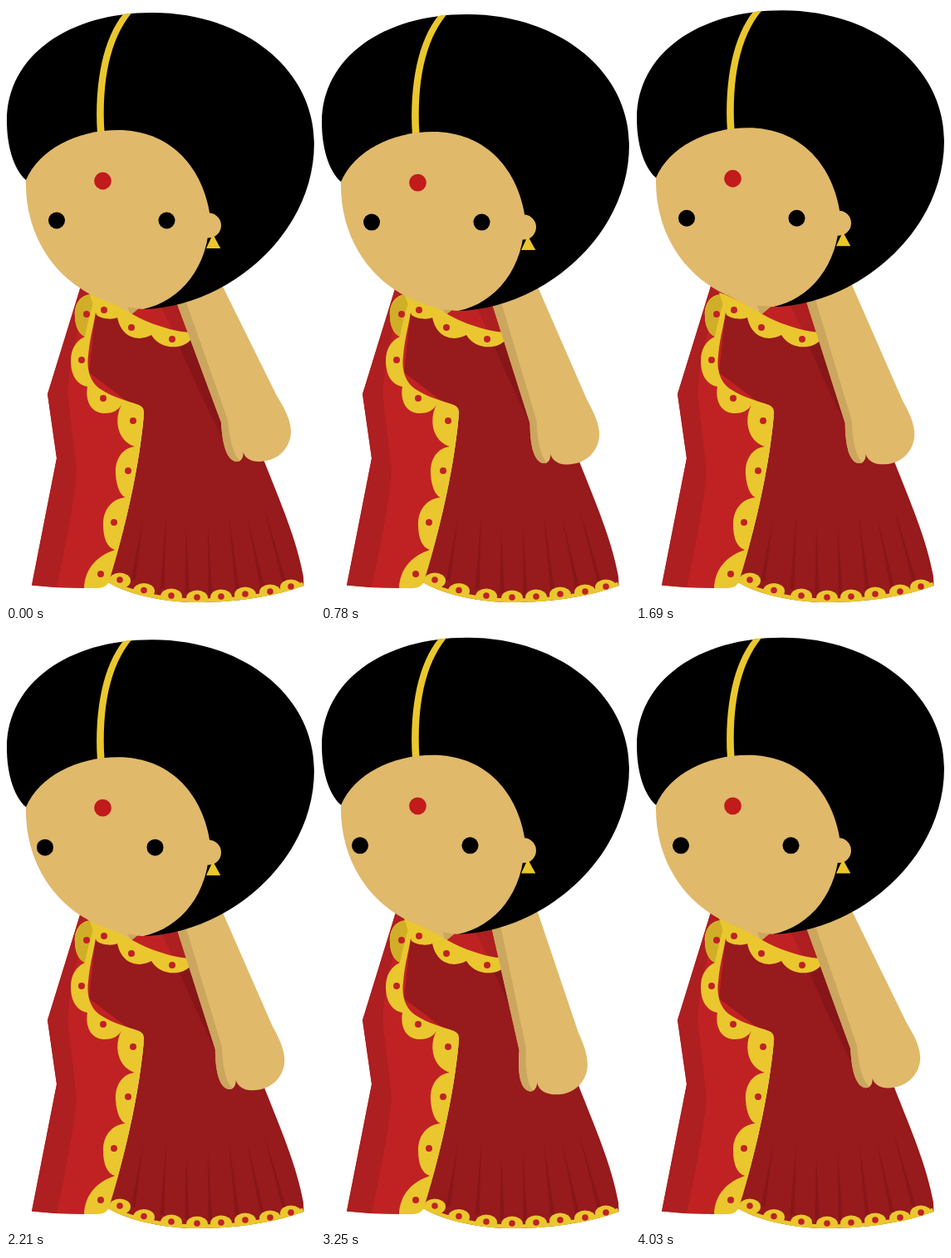
An HTML page for the animation above (4160 ms loop, 372 by 718 pixels).

```html
<!DOCTYPE html>
<html lang="en">
<head>
<meta charset="utf-8">
<title>Woman in a red sari</title>
<style>
html, body { margin: 0; width: 100%; height: 100%; overflow: hidden; background: #fff; }
svg { display: block; width: 100%; height: 100%; }
.red { fill: #c02223; }
.side { fill: #ad1f20; }
.dark { fill: #971a1c; }
.fold { fill: #871619; }
.gold { fill: #eac72e; }
.skin { fill: #e0b96b; }
.shade { fill: #cba65e; }
</style>
</head>
<body>
<svg viewBox="0 0 372 718">
  <defs>
    <clipPath id="skirtClip">
      <path id="skirt" d="M109 355 L222 355 L290 480 L311 547 C330 595 350 640 358 685 L358.5 696 C320 710 275 716 230 716 C195 716 150 708 123 692 C140 640 160 560 166 490 L100 440 Z"/>
    </clipPath>
  </defs>

  <g id="body">
    <path class="red" d="M92 330 L50 466 L61 543 L31 695.5 Q62 699 95 699 L124 692 L166 490 L120 340 Z"/>
    <path class="side" d="M92 330 L50 466 L61 543 L31 695.5 L61 698 Q82 600 85 558 L74 465 Q78 420 87 388 L105 335 Z"/>
    <use href="#skirt" class="dark"/>
    <path class="red" d="M130 352 H222 L226 394 Q180 388 140 366 Z"/>
    <path class="side" d="M182 352 H222 L226 394 L201 390 Z"/>
    <path class="fold" d="M201 391 L226 391 L275 530 L262 522 Q235 470 201 391 Z"/>
    <g id="pleats" class="fold"></g>
    <g id="hem" clip-path="url(#skirtClip)">
      <path d="M123 692 C150 708 195 716 230 716 C275 716 320 710 358.5 696" fill="none" stroke="#eac72e" stroke-width="9"/>
    </g>
    <path class="gold" d="M104 346 C88 346 82 360 83 372 C83 385 88 394 95 397 C84 402 78 412 78 426 C78 444 86 455 98 457 C95 473 102 489 119 489 C130 489 136 484 139 479 C130 495 133 522 155 529 C138 531 131 547 132 562 C133 578 138 588 144 590 C126 592 117 606 117 622 C117 640 122 650 131 653 C110 660 95 675 94 699 L110 699 C117 699 122 696 124 691 C140 640 160 560 166 490 Q167 482 160 479 C145 474 128 469 117 462 C100 453 97 435 99 420 C101 395 107 380 109 360 Z"/>
    <path fill="#d0ae28" d="M107 346 C88 346 82 360 83 372 C83 385 88 394 95 397 Q99 376 107 350 Z"/>
    <path class="skin" d="M100 340 L150 371 L166 358 Z"/>
    <path class="shade" d="M146 360 L150 371 L163 360 Z"/>
    <path class="gold" d="M100 344 C125 352 145 368 168 378 C190 387 205 391 224 392 L222 401 C212 413 186 413 175 395 C163 402 140 402 134 374 C128 377 115 376 109 371 Z"/>
    <g id="dots" class="red"></g>
  </g>

  <g id="arm">
    <path class="skin" d="M205 355 L259 500 C260 520 264 545 277 547 C284 548 287 540 285 533 C286 542 295 548 306 547 C330 546 343 528 343 511 C343 495 333 480 326 468 L255 325 L215 335 Z"/>
    <path class="shade" d="M205 355 L259 500 C260 520 264 545 277 547 Q280 547 282 546 C273 539 268 515 267 497 L215 350 Z"/>
  </g>

  <g id="head">
    <path d="M24 209 C8 195 1 165 1 138 C1 60 75 8 176 8 C285 8 371 75 371 165 C371 275 265 362 165 364 Z"/>
    <path class="gold" d="M141 9.8 C118 38 106 90 110 153 L118.5 151 C115 90 125 40 151 8.4 Z"/>
    <circle class="skin" cx="244" cy="263.5" r="15"/>
    <path class="skin" d="M24 209 C40 172 85 149 135 149 C195 149 235 190 245 248 C247 310 212 354 165 364 C72 356 22 285 24 209 Z"/>
    <path class="gold" d="M249 274 L258.3 291 H241 Z"/>
    <circle cx="116.5" cy="210" r="10.4" fill="#c11b1c"/>
    <g id="eyes">
      <circle cx="61" cy="257.5" r="10"/>
      <circle cx="193.5" cy="257.5" r="10"/>
    </g>
  </g>
</svg>
<script>
const $ = id => document.getElementById(id);

function add(parent, tag, attrs) {
  const el = document.createElementNS("http://www.w3.org/2000/svg", tag);
  for (const key in attrs) el.setAttribute(key, attrs[key]);
  $(parent).appendChild(el);
}

const trim = [[97, 370], [91, 425], [117, 471], [153, 498], [147, 558], [130, 620], [114, 682],
  [118, 365], [151, 386], [200, 400]];
const hem = [[137, 689], [166, 701.5], [199, 708], [230, 710], [259, 709], [288, 706], [318, 703], [343, 697]];
// top x, top y, bottom x, bottom y
const pleats = [[165, 615, 153, 690], [193, 612, 188, 700], [217, 628, 218, 705], [243, 625, 246, 708],
  [268, 610, 279, 705], [290, 612, 309, 700], [310, 600, 336, 695]];

for (const [x, y, bx, by] of pleats)
  add("pleats", "path", { d: `M${x} ${y} L${bx - 2.5} ${by} H${bx + 2.5} Z` });
for (const [x, y] of hem) {
  add("hem", "ellipse", { cx: x, cy: y + 1, rx: 13, ry: 9.5, class: "gold" });
  add("dots", "circle", { cx: x, cy: y, r: 3.8 });
}
for (const [x, y] of trim) add("dots", "circle", { cx: x, cy: y, r: 4 });

const STEP = 130, COUNT = 32;
const swing = [0, 3.3, 2.5, 8, 0]; // arm angle at each quarter of the loop
const clamp = v => Math.max(0, Math.min(1, v));
const ease = u => (1 - Math.cos(Math.PI * u)) / 2;

function draw(ms) {
  const k = Math.floor(ms / STEP) % COUNT;
  const q = Math.floor(k / 8);
  const angle = swing[q] + (swing[q + 1] - swing[q]) * ease(k % 8 / 8);
  const bob = 3 * Math.sin(2 * Math.PI * k / 16);
  const look = -14 * (clamp((k - 14) / 2) - clamp((k - 30) / 2));
  $("head").setAttribute("transform", `translate(0 ${bob.toFixed(2)})`);
  $("eyes").setAttribute("transform", `translate(${look} 0)`);
  $("arm").setAttribute("transform", `rotate(${angle.toFixed(3)} 232 350)`);
}

const start = performance.now();
function tick() {
  draw(performance.now() - start);
  requestAnimationFrame(tick);
}
tick();
</script>
</body>
</html>
```
